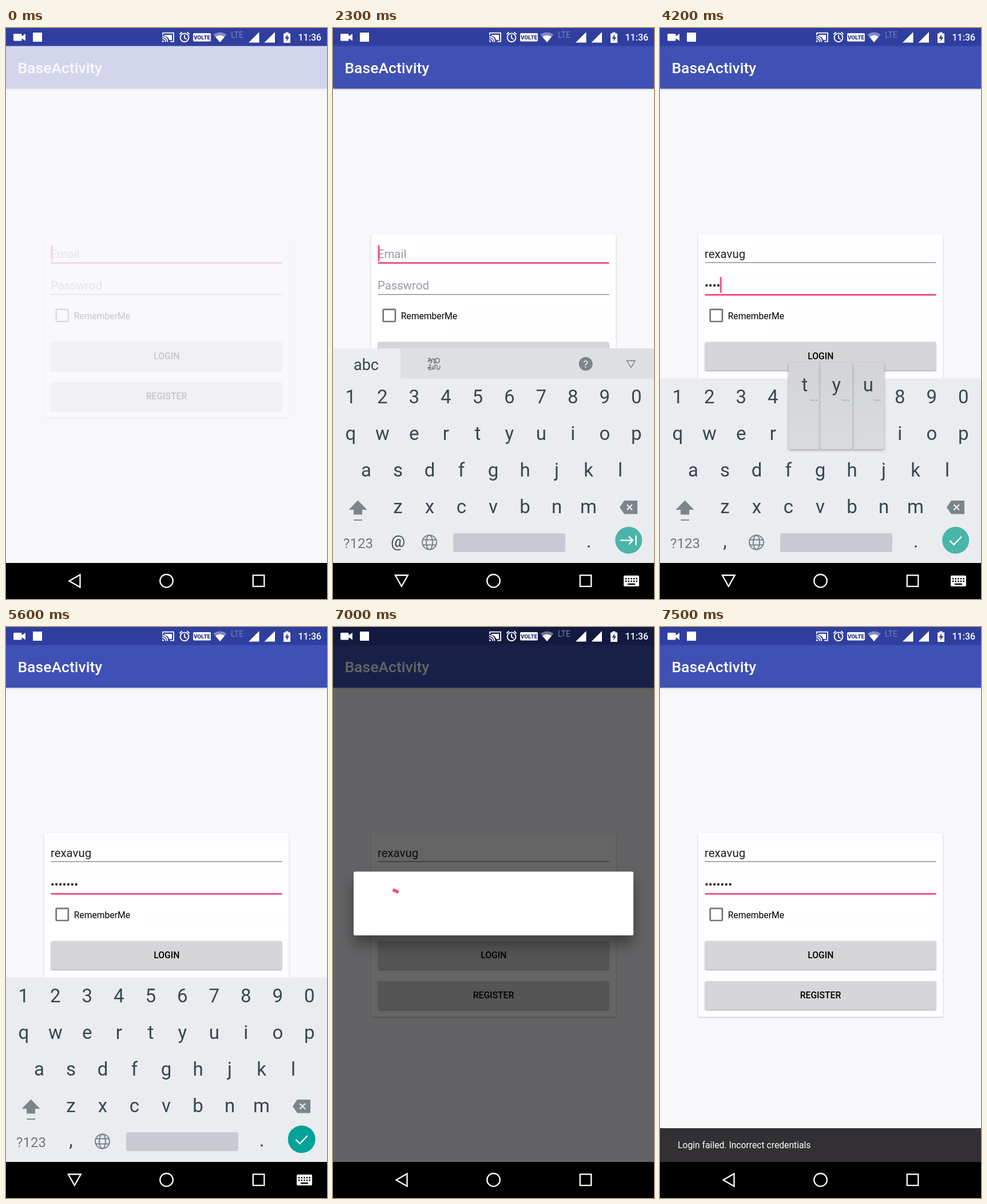
An HTML page that plays this animation: 561x998 px, repeating every 8 s.

```html
<!DOCTYPE html>
<html lang="en">
<head>
<meta charset="utf-8">
<title>Login screen</title>
<style>
html, body { margin: 0; width: 100%; height: 100%; overflow: hidden; background: #f8f7fa; }
svg { display: block; width: 100vw; height: 100vh; }
text { font-family: Roboto, "Noto Sans", sans-serif; white-space: pre; }
.mid { text-anchor: middle; }
.field { font-size: 20.4px; fill: #212124; }
.hint { fill: #9c9a9f; }
.small { font-size: 15.7px; }
.med { font-weight: 500; }
.focus { fill: #f5417d; }
.rule { fill: #8a898c; }
.card { fill: #fefdff; filter: drop-shadow(0 1.3px 1.3px rgba(0,0,0,.26)); }
.btn { fill: #d6d5d8; filter: drop-shadow(0 2px 1.3px rgba(0,0,0,.28)); }
.raised { fill: #d0cdd0; filter: drop-shadow(0 5px 4px rgba(0,0,0,.3)); }
.bar { fill: #3f51b5; filter: drop-shadow(0 1.5px 1.5px rgba(0,0,0,.28)); }
.key { font-size: 33px; fill: #37474f; text-anchor: middle; }
.pop rect { fill: url(#popFill); filter: drop-shadow(0 2px 2px rgba(0,0,0,.32)); }
.line { fill: none; stroke: #fff; stroke-width: 2.3; }
.grey { fill: #7b868b; }
.sheet { fill: #fff; filter: drop-shadow(0 16px 13px rgba(0,0,0,.36)); }

#app, #board, #dim, #dialog, #spin, #ripple, #snack, #snackText {
  animation: 8s step-end infinite;
}
#app { animation-name: enter; }
#board { animation-name: board; }
#dim { animation-name: dim; }
#dialog { animation-name: dialog; }
#spin { animation-name: spin; transform-origin: 99.5px 483px; }
#ripple { animation-name: ripple; transform-origin: 364px 573px; }
#snack { animation-name: snack; }
#snackText { animation-name: snackText; }

@keyframes enter {
  0% { opacity: .2 } 1.25% { opacity: .55 } 2.5% { opacity: .85 } 3.75%, 100% { opacity: 1 }
}
@keyframes board {
  0% { opacity: 0; transform: translateY(90px) }
  26.25% { opacity: .6; transform: translateY(50px) }
  27.5% { opacity: 1; transform: none }
  71.25% { opacity: .7; transform: translateY(40px) }
  72.5% { opacity: .25; transform: translateY(90px) }
  73.75%, 100% { opacity: 0; transform: translateY(90px) }
}
@keyframes dim {
  0% { opacity: 0 } 83.75% { opacity: .03 } 85% { opacity: .1 } 86.25% { opacity: .4 }
  87.5% { opacity: .6 } 90% { opacity: .3 } 91.25%, 100% { opacity: 0 }
}
@keyframes dialog {
  0% { opacity: 0 } 83.75% { opacity: .1 } 85% { opacity: .53 } 86.25% { opacity: .95 }
  87.5% { opacity: 1 } 90% { opacity: .45 } 91.25%, 100% { opacity: 0 }
}
@keyframes spin {
  0% { transform: rotate(-100deg); stroke-dasharray: 8 360 }
  85% { transform: rotate(-93.4deg); stroke-dasharray: 14 360 }
  86.25% { transform: rotate(-86deg); stroke-dasharray: 17 360 }
  87.5% { transform: rotate(-78deg); stroke-dasharray: 26 360 }
  88.75% { transform: rotate(-68deg); stroke-dasharray: 60 360 }
  90%, 100% { transform: rotate(-58deg); stroke-dasharray: 110 360 }
}
@keyframes ripple {
  0% { opacity: 0; transform: scale(.1) }
  81.25% { opacity: 1; transform: scale(.3) }
  82.5% { opacity: 1; transform: scale(.55) }
  83.75% { opacity: 1; transform: scale(.78) }
  85% { opacity: 1; transform: scale(1) }
  86.25% { opacity: .5; transform: scale(1.5) }
  87.5%, 100% { opacity: 0; transform: scale(1.8) }
}
@keyframes snack {
  0% { transform: translateY(60px) } 88.75% { transform: translateY(54px) }
  90% { transform: translateY(15px) } 91.25%, 100% { transform: none }
}
@keyframes snackText {
  0% { opacity: 0 } 91.25% { opacity: .75 } 92.5% { opacity: .92 } 93.75%, 100% { opacity: 1 }
}
</style>
</head>
<body>
<svg viewBox="0 0 561 998" preserveAspectRatio="none">
  <defs>
    <linearGradient id="popFill" x2="0" y2="1">
      <stop stop-color="#d3d4d6"/><stop offset="1" stop-color="#dadbdd"/>
    </linearGradient>
    <clipPath id="loginClip"><rect x="78.5" y="548.5" width="404" height="49.5" rx="2.5"/></clipPath>
  </defs>

  <rect width="561" height="998" fill="#f8f7fa"/>

  <g id="app">
    <rect class="bar" y="31" width="561" height="75"/>
    <text class="med" x="20.4" y="78.8" font-size="26.5" fill="#fff">BaseActivity</text>
    <rect class="card" x="66.5" y="359.5" width="428" height="322" rx="2.5"/>

    <text class="field hint" id="emailHint" x="77.9" y="401.5">Email</text>
    <text class="field" id="email" x="77.9" y="401.5"></text>
    <rect class="focus" id="emailOn" x="78.5" y="409.3" width="404" height="2.7"/>
    <rect class="rule" id="emailOff" x="78.5" y="409.3" width="404" height="1.4"/>
    <rect class="focus" id="emailCaret" x="78.6" y="379.5" width="2.7" height="28"/>

    <text class="field hint" id="passHint" x="77.9" y="457.2">Passwrod</text>
    <text class="field" id="pass" x="77.9" y="457.2"></text>
    <rect class="rule" id="passOff" x="78.5" y="465" width="404" height="1.4"/>
    <rect class="focus" id="passOn" x="78.5" y="465" width="404" height="2.7"/>
    <rect class="focus" id="passCaret" x="77.3" y="435" width="2.7" height="28"/>

    <rect x="87.7" y="491.8" width="21.2" height="21.2" rx="1.5" fill="none" stroke="#767578" stroke-width="2.7"/>
    <text class="small" x="118.7" y="508.5">RememberMe</text>

    <rect class="btn" x="78.5" y="548.5" width="404" height="49.5" rx="2.5"/>
    <rect class="raised" id="pressed" x="78.5" y="548.5" width="404" height="49.5" rx="2.5"/>
    <g clip-path="url(#loginClip)">
      <circle id="ripple" cx="364" cy="573" r="43" fill="#000" fill-opacity=".07"/>
    </g>
    <text class="small med mid" x="280.8" y="578.6">LOGIN</text>
    <rect class="btn" x="78.5" y="618.8" width="404" height="49.5" rx="2.5"/>
    <text class="small med mid" x="280.5" y="648.7">REGISTER</text>
  </g>

  <g id="board">
    <g id="strip">
      <rect y="560" width="561" height="53" fill="#dde0e3"/>
      <rect y="560" width="118" height="53" fill="#eaecef"/>
      <text class="mid" x="58" y="598" font-size="27" fill="#37474f">abc</text>
      <g fill="none" stroke="#6f7a7f" stroke-width="1.5">
        <path d="M166 578c4-2 6 1 3 4s-4-2 0-2 4 5 1 6M173 584c-2-6 4-8 4-2v4c3 0 3-8 0-8M179 586v-5c0-5 7-5 7 0s-5 6-5 2"/>
        <path d="M167 589c4-2 5 2 2 3s-3 5 1 5 5-2 5-7c0 6 1 7 0 7M178 597v-6c0-3 4-3 4 0v5c4 2 5-1 5-6M165 594h8"/>
      </g>
      <circle class="grey" cx="441.7" cy="587" r="12"/>
      <text class="mid med" x="441.7" y="594" font-size="19" fill="#dde0e3">?</text>
      <path d="M513.5 581.5h14.5l-7.2 12z" fill="none" stroke="#6f7a7f" stroke-width="1.3"/>
    </g>
    <rect y="612.5" width="561" height="323" fill="#eaecef"/>
    <g id="keys"></g>
    <path class="grey" d="M43.5 825.5l16 16.5h-8.5v8.5h-15v-8.5h-8.5zM36.5 859h14.500v2h-14.500z"/>
    <path class="grey" d="M509 826h23v23.500h-23l-8-11.700z"/>
    <path d="M513.500 833l9.500 9.500m0-9.500l-9.500 9.500" stroke="#eaecef" stroke-width="2.400"/>
    <text class="mid" x="44" y="908.500" font-size="24" fill="#6d7a80">?123</text>
    <g fill="none" stroke="#77848a" stroke-width="2">
      <circle cx="168.500" cy="899" r="12.500"/>
      <ellipse cx="168.500" cy="899" rx="5.500" ry="12.500"/>
      <path d="M157 894.500h23m-23 9h23"/>
    </g>
    <rect x="210" y="883" width="196" height="33" rx="4" fill="#c7cad2"/>
    <text class="key" x="447" y="908" font-size="30">.</text>
    <circle cx="516.700" cy="895.300" r="23.500" fill="#4ab5aa"/>
    <circle id="tapNext" cx="516.700" cy="895.300" r="24" fill="#00a398"/>
    <circle id="tapDone" cx="516.700" cy="895.300" r="24" fill="#00a398"/>
    <g id="emailKeys">
      <text class="mid" x="113.500" y="907" font-size="28" fill="#37474f">@</text>
      <path class="line" stroke-width="2.500" d="M502 895.500h22m-7-7l7 7-7 7M529.500 887v17"/>
    </g>
    <g id="passKeys">
      <text class="key" x="113.500" y="908">,</text>
      <path class="line" d="M506.500 896l7 7 13.500-14"/>
    </g>
    <g id="pops"></g>
  </g>

  <g id="snack">
    <rect y="876" width="561" height="60" fill="#323033"/>
    <text class="small" id="snackText" x="31" y="911.300" fill="#fff">Login failed. Incorrect credentials</text>
  </g>

  <rect width="561" height="31.500" fill="#303f9f"/>
  <rect id="dim" width="561" height="935"/>

  <g id="dialog">
    <rect class="sheet" x="36" y="427.500" width="489" height="111.500" rx="2.500"/>
    <circle id="spin" cx="99.500" cy="483" r="24" pathLength="360" fill="none" stroke="#f5417d" stroke-width="5.500"/>
  </g>

  <g fill="#fff">
    <path d="M14.500 10h11.500q1.500 0 1.500 1.500v3l6.500-4.500v12.500l-6.500-4.500v3q0 1.500-1.500 1.500h-11.500q-1.500 0-1.500-1.500v-9.500q0-1.500 1.500-1.500z"/>
    <rect x="47" y="8" width="16" height="16"/>
    <path d="M277 12h13v9h-4.500q-2-6-8.500-7zM273 21.500q3 0 3 3h-3z"/>
    <path class="line" stroke-width="1.800" style="stroke-width:1.800px" d="M274 12.500v-3.800h19v15h-6M273 18.300q6 .5 6.300 6.200M273 15q9 .500 9.600 9.500"/>
    <circle class="line" style="stroke-width:1.900px" cx="312" cy="16.800" r="7.400"/>
    <path class="line" style="stroke-width:1.900px" d="M312 12v5.500l3.800 2.300M303.300 11l4.200-3.700M320.700 11l-4.200-3.700"/>
    <rect x="327" y="9" width="31" height="14.500" rx="2"/>
    <text class="mid" x="342.500" y="19.800" font-size="9.800" font-weight="900" fill="#26327f">VOLTE</text>
    <path d="M362.500 11.500q11.500-8 23 0l-11.500 13.500z" fill-opacity=".4"/>
    <path d="M366 15.500q8-5.500 16 0l-8 9.500z"/>
    <text x="393" y="17" font-size="14" fill="#7580c0">LTE</text>
    <path d="M424 25.500h18.500V7zM451.500 25.500h18.500V7z"/>
    <path d="M488.500 7.500h5v2h3.500v16.500h-12v-16.500h3.500z"/>
    <path d="M492 11l-4.500 7.500h3v5l4.500-7.500h-3z" fill="#303f9f"/>
    <text class="med" x="510.500" y="21.800" font-size="16">11:36</text>
  </g>

  <rect y="935" width="561" height="63"/>
  <path class="line" id="back" d="M110.500 966.500l19-11v22z"/>
  <g id="backDown">
    <path class="line" d="M108.800 956.500h22l-11 19.500z"/>
    <rect x="508" y="957" width="27" height="19" rx="2" fill="#fff"/>
    <path d="M511 962.500h21m-21 4.500h21" stroke="#000" stroke-width="2.300" stroke-dasharray="2.400 2.200"/>
    <path d="M515 972h13" stroke="#000" stroke-width="2.300"/>
  </g>
  <circle class="line" cx="280.500" cy="966.300" r="11.300"/>
  <rect class="line" x="431.800" y="956.500" width="19.500" height="19.500"/>
</svg>

<script>
const LOOP = 8000;
const $ = id => document.getElementById(id);

function add(parent, tag, attrs = {}, text = '') {
  const node = document.createElementNS('http://www.w3.org/2000/svg', tag);
  for (const name in attrs) node.setAttribute(name, attrs[name]);
  node.textContent = text;
  return parent.appendChild(node);
}

// Hard changes of one property: [[time, value], ...]
function steps(node, prop, list) {
  const frames = [...list, [LOOP, list[list.length - 1][1]]].map(([time, value]) =>
    ({ offset: time / LOOP, [prop]: value, easing: 'step-end' }));
  node.animate(frames, { duration: LOOP, iterations: Infinity });
}

// Visible from the first time, then toggled at each further one
function toggle(node, ...times) {
  const list = times.map((time, i) => [time, i % 2 ? 'hidden' : 'visible']);
  if (times[0] > 0) list.unshift([0, 'hidden']);
  steps(node, 'visibility', list);
}

const keyAt = {};
const rows = [['1234567890', 30.8], ['qwertyuiop', 30.8], ['asdfghjkl', 58], ['zxcvbnm', 113.5]];
rows.forEach(([chars, left], row) => [...chars].forEach((char, i) => {
  const x = left + 55.5 * i, y = 656 + 64 * row;
  keyAt[char] = [x, y];
  add($('keys'), 'text', { class: 'key', x, y }, char);
}));

function popup(char, time) {
  const [x, y] = keyAt[char];
  const pop = add($('pops'), 'g', { class: 'pop' });
  add(pop, 'rect', { x: x - 28, y: y - 136, width: 56, height: 152, rx: 4 });
  add(pop, 'text', { class: 'key', x, y: y - 85 }, char);
  add(pop, 'path', { d: `M${x + 10.5} ${y - 69.5}h11`, stroke: '#8a9296', 'stroke-width': 1.8, 'stroke-dasharray': '2 2.5' });
  toggle(pop, time, time + 300);
}

// Presses keys, fills the field and moves its caret
function type(id, keys, shown, times, lag) {
  const field = $(id);
  const moves = [[0, 'none']];
  [...keys].forEach((char, i) => {
    popup(char, times[i]);
    toggle(add(field, 'tspan', {}, shown[i]), times[i] + lag);
  });
  times.forEach((time, i) =>
    moves.push([time + lag, `translateX(${field.getSubStringLength(0, i + 1)}px)`]));
  steps($(id + 'Caret'), 'transform', moves);
  toggle($(id + 'Hint'), 0, times[0] + lag);
}

type('email', 'rexavug', 'rexavug', [2400, 2500, 2600, 2700, 2850, 2900, 3000], 200);
type('pass', 'ygutygv', '•••••••', [3800, 3900, 4000, 4100, 4200, 4300, 4500], 100);

toggle($('emailCaret'), 0, 500, 1000, 1500, 2000, 3600);
toggle($('passCaret'), 3600, 5200, 5700, 6200, 6700, 7000);
toggle($('emailOn'), 0, 3600);
toggle($('emailOff'), 3600);
toggle($('passOff'), 0, 3600);
toggle($('passOn'), 3600);
toggle($('strip'), 0, 3600);
toggle($('emailKeys'), 0, 3600);
toggle($('passKeys'), 3600);
toggle($('tapNext'), 3500, 3600);
toggle($('tapDone'), 5600, 5900);
toggle($('pressed'), 6500, 6900);
toggle($('backDown'), 2100, 5700);
toggle($('back'), 0, 2100, 5700);
</script>
</body>
</html>
```
